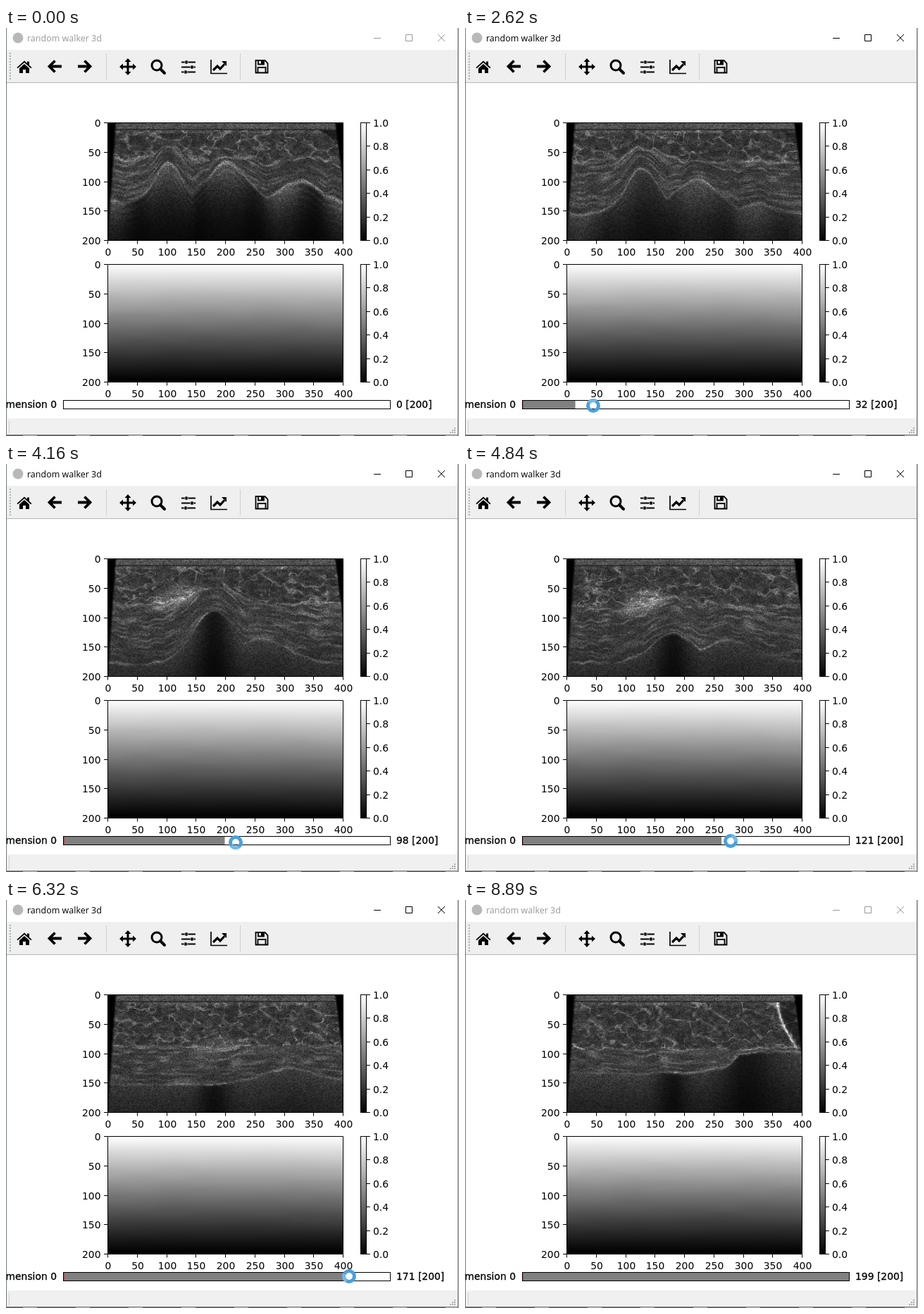
An HTML page with a canvas for the animation above (8950 ms loop, 643 by 579 pixels).

```html
<!DOCTYPE html>
<html lang="en">
<head>
<meta charset="utf-8">
<title>random walker 3d</title>
<style>
html, body { margin: 0; width: 643px; height: 579px; overflow: hidden; background: #fff; }
canvas, svg { position: absolute; left: 0; top: 0; display: block; }
canvas { left: 145px; }
#scan { top: 135px; }
#prob { top: 335px; }
.plot { font: 13.89px "DejaVu Sans", sans-serif; }
.caption { font: 12.5px "Open Sans", "Noto Sans", sans-serif; }
.line { fill: none; stroke: #000; }
.heavy { stroke: #000; stroke-width: .3; }
</style>
</head>
<body>
<canvas id="scan" width="334" height="167"></canvas>
<canvas id="prob" width="334" height="167"></canvas>
<svg id="stage" width="643" height="579" viewBox="0 0 643 579">
  <defs>
    <linearGradient id="ramp" x1="0" y1="0" x2="0" y2="1"><stop stop-color="#fff"/><stop offset="1"/></linearGradient>
  </defs>
  <g id="caption" class="caption">
    <text x="30" y="19" fill="currentColor">random walker 3d</text>
    <path d="M522 14.5h10M567.5 9.5h9v9h-9zM613 9l10 10m0-10l-10 10" fill="none" stroke="currentColor"/>
  </g>
  <circle cx="17" cy="14" r="7.5" fill="#b8b8b8"/>

  <rect y="31" width="642" height="46" fill="#efefef"/>
  <path d="M0 77.5H642" stroke="#b4b4b4"/>
  <path d="M6 35V74" stroke="#b0b0b0" stroke-width="2" stroke-dasharray="2 2"/>
  <path d="M142.500 36V73M332.500 36V73" stroke="#cfcfcf"/>
  <g id="tools">
    <path d="M26 46.500l4 3.600V47.500h3v5.300l3.500 3.100-1.200 1.400L26 49l-9.300 8.300-1.200-1.400zM26 51l7 6.200V64h-5v-5h-4v5h-5v-6.800z"/>
    <path id="arrow" d="M69.500 46.500l-8 8 8 8M62 54.500H79" class="line" stroke-width="3.800"/>
    <use href="#arrow" transform="translate(181 0) scale(-1 1)"/>
    <path d="M173 43l4.500 5h-3v5.500h5.500v-3l5 4.500-5 4.500v-3h-5.500V62h3l-4.500 5-4.500-5h3v-5.500H166v3L161 55l5-4.500v3h5.500V48h-3z"/>
    <circle cx="214" cy="53" r="7" class="line" stroke-width="3"/>
    <path d="M219 58l6 6" class="line" stroke-width="4" stroke-linecap="round"/>
    <path d="M249 48.500h20M249 55.500h20M249 62.500h20" class="line" stroke-width="2"/>
    <path d="M254 46h4v5h-4zM262 53h4v5h-4zM253 60h4v5h-4z" stroke="#efefef" stroke-width=".7"/>
    <path d="M291 45v19.500h23" class="line" stroke-width="1.700"/>
    <path d="M294 60l6-6 4 4 6-6.500" class="line" stroke-width="3.200"/>
    <path d="M306 47h7v7z"/>
    <path d="M354.500 46h13l4 4v13.500h-17zM357.500 63v-7h11v7M358 46v5.500h8V46" class="line" stroke-width="1.800"/>
    <path d="M362 47h3v4h-3z"/>
  </g>

  <g id="axes" class="plot"></g>

  <rect x="81.500" y="528.500" width="464" height="12" fill="#fff"/>
  <rect id="fill" x="82" y="529" width="0" height="11" fill="#808080"/>
  <path id="start" d="M82.500 529v11" stroke="#c04040"/>
  <rect x="81.500" y="528.500" width="464" height="12" class="line"/>
  <g class="plot heavy">
    <text x="72" y="539" text-anchor="end">Dimension 0</text>
    <text id="value" x="554" y="539"></text>
  </g>

  <rect y="554" width="642" height="23" fill="#f0f0f0"/>
  <path d="M4.500 557V575" stroke="#d0d0d0"/>
  <path d="M637 567v9M634 570v6M631 573v3" stroke="#b0b0b0" stroke-width="2" stroke-dasharray="2 1"/>
  <path d="M0 577.500H643" stroke="#777"/>
  <path d="M0 578.500H643" stroke="#606060"/>
  <path d="M24 578.500H643" stroke="#d8c49a" stroke-dasharray="20 55"/>
  <path d="M.500 0V579M641.500 0V579" stroke="#707878"/>
  <path d="M642.500 0V579" stroke="#c4c4c4"/>

  <path id="pointer" d="M.500 .500v16l3.700-3.500 2.600 6 2.300-1-2.600-5.800h5.200z" fill="#fff" stroke="#000"/>
  <g id="busy" fill="none" stroke-width="5">
    <circle r="7.500" stroke="#4a9fdc"/>
    <path id="glow" d="M-7.500 0A7.500 7.500 0 0 1 0-7.500" stroke="#74b9e8"/>
  </g>
</svg>
<script>
const LOOP = 8950, START = 1515, TICK = 77.4;
const W = 334, H = 167, LAST = 199;
const $ = id => document.getElementById(id);
const clamp = (v, lo = 0, hi = 1) => Math.min(hi, Math.max(lo, v));
const mix = (a, b, k) => a + (b - a) * k;
const ease = v => { v = clamp(v); return v * v * (3 - 2 * v); };
const bell = (v, w) => Math.exp(-v * v / (w * w));

// The drag: tick, pointer x, pointer y, slice
const drag = [
  [-14, 39, 571, 0], [-7, 77, 543, 0], [-5, 77, 543, 0], [-3, 81, 534, 0], [0, 82, 534, 0],
  [6, 126, 533, 5], [22, 237, 538, 59], [34, 326, 537, 98], [53, 448, 532, 152],
  [71, 525, 535, 190], [81, 559, 541, LAST], [85, 559, 541, LAST], [89, 600, 580, LAST]];

function pose(tick) {
  let i = 0;
  while (i < drag.length - 2 && tick >= drag[i + 1][0]) i++;
  const [a, b] = [drag[i], drag[i + 1]];
  const k = clamp((tick - a[0]) / (b[0] - a[0]));
  return a.map((v, n) => Math.round(mix(v, b[n], k)));
}

function hash(x, y, z = 0) {
  let h = Math.imul(x, 374761393) ^ Math.imul(y, 668265263) ^ Math.imul(z, 974634777);
  h = Math.imul(h ^ h >>> 13, 1274126177);
  h = Math.imul(h ^ h >>> 16, 2246822519);
  return ((h ^ h >>> 15) >>> 0) / 4294967296;
}

function noise(x, y, z = 0) {
  const i = Math.floor(x), j = Math.floor(y), u = ease(x - i), v = ease(y - j);
  return mix(mix(hash(i, j, z), hash(i + 1, j, z), u),
    mix(hash(i, j + 1, z), hash(i + 1, j + 1, z), u), v);
}

// Distance to the wall between neighbouring fat lobules
function wall(x, y, z) {
  const i = Math.floor(x), j = Math.floor(y);
  let near = 9, next = 9;
  for (let b = j - 1; b <= j + 1; b++) for (let a = i - 1; a <= i + 1; a++) {
    const h = hash(a, b, 5) * 6.28;
    const d = Math.hypot(a + .5 + .42 * Math.sin(h + z) - x, b + .5 + .42 * Math.cos(h * 3 + z) - y);
    if (d < near) { next = near; near = d; } else if (d < next) next = d;
  }
  return next - near;
}

function paint(id, shade) {
  const ctx = $(id).getContext('2d'), img = ctx.createImageData(W, H);
  for (let x = 0; x < W; x++) {
    const column = shade(x);
    for (let y = 0; y < H; y++) {
      const p = (y * W + x) * 4;
      img.data[p] = img.data[p + 1] = img.data[p + 2] = column(y);
      img.data[p + 3] = 255;
    }
  }
  ctx.putImageData(img, 0, 0);
}

// Fat above, fibres in the middle, ribs and their shadows below
function paintScan(s) {
  const k = s / LAST, z = s * .09, mid = Math.sin(k * Math.PI);
  const ribs = 1 - ease(s / 70), late = ease((s - 168) / 18);
  const patch = ease((s - 60) / 30) * (1 - ease((s - 160) / 20));
  const rib = mix(85, 150, clamp(s / 98)), ribWidth = mix(42, 26, ribs);
  const ribHeight = (55 + 20 * mid) * (1 - ease((s - 100) / 45));
  const nextRib = 168 + s / 2, nextHeight = 55 - s / 5;
  const reach = mix(120, 45, ribs), px = 28 + s * .68, py = 24 + s * .31;

  paint('scan', x => {
    const wob = (noise(x / 11, z) - .5) * 7;
    const bump = ribHeight * bell(x - rib, ribWidth);
    const fat = mix(50, 76, k) - .3 * bump + wob;
    const deep = Math.max(fat + 6, 110 + 38 * mid + wob * .5 - 40 * late * ease((x - 220) / 60)
      - Math.max(bump, nextHeight * bell(x - nextRib, ribWidth + 12), 28 * ribs * bell(x - 270, 35)));
    const shadow = 1 - .65 * (1 - ribs) * (bell(x - rib, 24) + late * bell(x - 255, 45));
    const beam = 1 + .5 * ribs * Math.cos((x - rib - s * 5) / 83 * 6.283);
    return y => {
      let v;
      if (y < 8) v = 72 + 18 * noise(x / 30, y / 2);
      else if (y < 10) v = 50;
      else if (y < fat) {
        const warp = noise(x / 9, y / 7, 2) * .6;
        const edge = wall(x / 36 + warp, y / 24 + warp, z);
        v = 42 + 26 * noise(x / 6, y / 4, s) + 70 * bell(edge, .1) * noise(x / 8, y / 5 + z, 3);
        v += 45 * bell(y - 12, 2) * noise(x / 14, z, 7);
      } else if (y < deep) {
        const depth = (y - fat) / (deep - fat);
        const fibre = noise(x / 17 + z, (y - mix(fat, deep, .5)) / 3, 4);
        v = 52 + 62 * fibre * fibre * (1 - .4 * depth);
      } else {
        const depth = y - deep;
        v = (62 * Math.exp(-depth / reach) + 4) * beam * shadow;
        v += ribs * 40 * bell(depth % 10 - 3, 2) * Math.exp(-depth / 18) * noise(x / 25, z, 8);
      }
      v += 55 * bell(y - fat, 2) * noise(x / 18, z, 9);
      v += 65 * bell(y - deep, 2) * noise(x / 22, z, 10);
      v += 45 * patch * ease(1.4 - Math.hypot((x - px) / 34, (y - py - (px - x) * .25) / 18));
      if (late && y > 9) {
        const off = x - (297 + y * .33 - 5 * Math.sin(y / 20));
        if (off > 0) v *= 1 - .4 * late * ease(off / 8);
        v += 140 * late * bell(off, 2) * ease((90 - y) / 45);
      }
      if (y > 9 && y < 8 + ((x - 288) / 42) ** 2 * 28 && x > 288) v *= mix(1, .45, ribs);
      v *= ease((x - 8 + y * .07) / 5) * ease((322 + y * .13 - x) / 4 + .5);
      v *= mix(1, .75, ease((y - 90) / 75));
      const grain = hash(x, y, s) + hash(x >> 1, y, s + 300) + noise(x / 1.7, y / 1.5, s + 600);
      return v * (.46 + grain * .36);
    };
  });
}

function paintProb(s) {
  const lean = Math.sin(s / 60);
  paint('prob', x => {
    const u = x / W, bow = 2 * lean * (u - .5) - 2 * Math.sin(u * 3.14);
    return y => {
      const q = y / (H - 1);
      const warp = (bow + 3 * (noise(x / 45, y / 9 + s / 30, 12) - .5)) * 4 * q * (1 - q);
      return 255 * clamp(1 - q + warp / H) ** 1.08;
    };
  });
}

function drawAxes() {
  const out = [];
  const label = (x, y, text, anchor) => out.push(`<text x="${x}" y="${y}" text-anchor="${anchor}">${text}</text>`);
  const line = d => out.push(`<path class="line" d="${d}"/>`);
  for (const top of [134.5, 335.5]) {
    const base = top + 167;
    line(`M144.500 ${top}h334v167h-334z`);
    out.push(`<rect x="503.500" y="${top}" width="8" height="167" fill="url(#ramp)" stroke="#000"/>`);
    for (let i = 0; i < 9; i++) {
      const x = 144.5 + Math.round(i * 41.75);
      line(`M${x} ${base}v5`);
      label(x + .5, base + 21.5, i * 50, 'middle');
    }
    for (let i = 0; i < 5; i++) {
      const y = top + Math.round(i * 41.75);
      line(`M144 ${y}h-5`);
      label(134.5, y + 5.5, i * 50, 'end');
    }
    for (let i = 0; i < 6; i++) {
      const y = base - Math.round(i * 33.4);
      line(`M512 ${y}h5`);
      label(521, y + 5.5, (i / 5).toFixed(1), 'start');
    }
  }
  $('axes').innerHTML = out.join('');
}

let shown = -1;
function draw(time) {
  const tick = Math.floor((time - START) / TICK);
  const [, x, y, slice] = pose(tick);
  if (slice !== shown) {
    paintScan(slice);
    paintProb(slice);
    $('fill').setAttribute('width', slice * 464 / LAST);
    $('value').textContent = `${slice} [200]`;
    shown = slice;
  }
  $('caption').style.color = tick >= 0 && time < 8890 ? '#000' : '#999';
  $('start').style.display = tick >= 0 ? '' : 'none';

  const inside = tick >= -14 && tick < 89, busy = tick >= 12 && tick < 65;
  for (const [id, on] of [['pointer', inside && !busy], ['busy', inside && busy]]) {
    $(id).style.display = on ? '' : 'none';
    $(id).setAttribute('transform', `translate(${x} ${y})`);
  }
  $('glow').setAttribute('transform', `rotate(${tick * 28})`);
}

function frame() {
  draw(performance.now() % LOOP);
  requestAnimationFrame(frame);
}
drawAxes();
frame();
</script>
</body>
</html>
```
